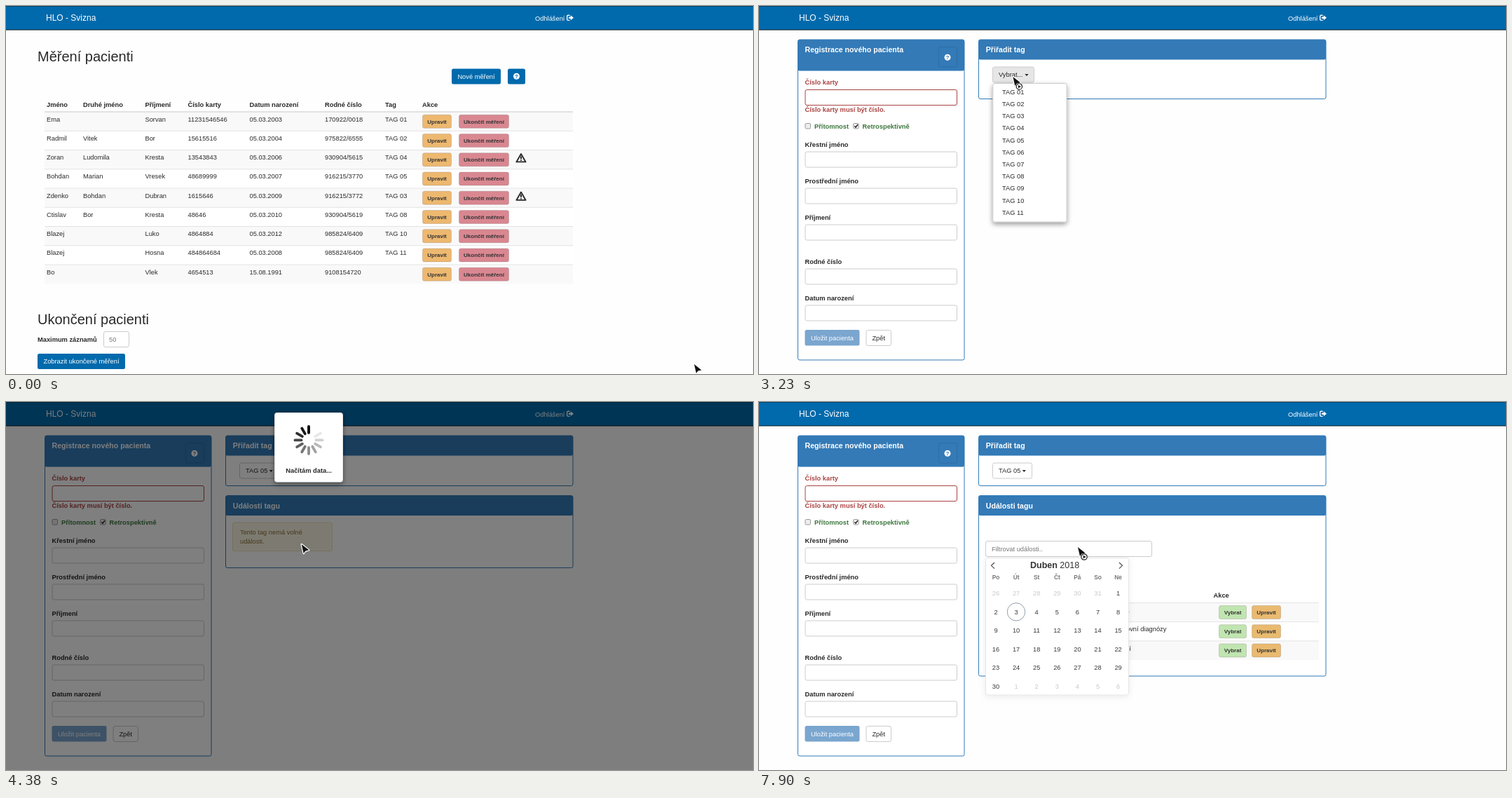
These frames come from a looping animation (1066x525 px, 8000 ms). An HTML page:

```html
<!DOCTYPE html>
<html lang="cs">
<head>
<meta charset="utf-8">
<style>
  html, body { margin: 0; height: 100%; overflow: hidden; background: #fefefe; }
  svg { display: block; font: 9.3px "Liberation Sans", Arial, sans-serif; }
  text { white-space: pre; }
</style>
</head>
<body>
<svg id="stage" width="1066" height="525" viewBox="0 0 1066 525"></svg>
<script>
const INK = '#292929', BRAND = '#016aac', PANEL = '#337ab7', RED = '#a94442', GREEN = '#3c763d';
const LOOP = 8000;

// Drawing helpers
const text = (x, y, s, fill = INK, size = 9.3, extra = '') =>
  `<text x="${x}" y="${y}" fill="${fill}" font-size="${size}" ${extra}>${s}</text>`;
const bold = (x, y, s, fill, size) => text(x, y, s, fill, size, 'font-weight="700"');
const centered = (x, y, s, fill, size, weight = 400) =>
  text(x, y, s, fill, size, `text-anchor="middle" font-weight="${weight}"`);
const box = (x1, y1, x2, y2, fill, stroke = 'none', r = 2.5, extra = '') =>
  `<rect x="${x1}" y="${y1}" width="${x2 - x1}" height="${y2 - y1}" rx="${r}" fill="${fill}" stroke="${stroke}" ${extra}/>`;
const path = (d, fill, extra = '') => `<path d="${d}" fill="${fill}" ${extra}/>`;
const group = (id, content, extra = '') => `<g id="${id}" ${extra}>${content}</g>`;
const each = (list, draw) => list.map(draw).join('');

const field = (y, stroke = '#ccc') => box(66, y, 282.5, y + 22, '#fff', stroke);
const smallButton = (x1, x2, y, label, fill) =>
  box(x1, y, x2, y + 19, fill, 'rgba(120,100,100,.25)') + centered((x1 + x2) / 2, y + 12.4, label, '#333', 8, 700);
const help = (x, y, color) =>
  `<circle cx="${x}" cy="${y}" r="4.5" fill="#fff"/>` + centered(x, y + 2.8, '?', color, 8, 700);
const caret = x => path(`M${x - 2.6} 97h5.2l-2.6 2.9z`, INK);
const checkbox = y => x => box(x, y, x + 7.5, y + 7.5, '#eee', '#999', 1.5);
const panel = (x1, y1, x2, y2, headBottom, title) =>
  box(x1, y1, x2, y2, '#fff', PANEL) + box(x1, y1, x2, headBottom, PANEL) +
  bold(x1 + 10.3, y1 + 18, title, '#fff', 10.6);

// List page
const columns = [58, 110, 198.5, 259.5, 347.5, 455, 541, 594];
const headings = ['Jméno', 'Druhé jméno', 'Příjmení', 'Číslo karty', 'Datum narození', 'Rodné číslo', 'Tag', 'Akce'];
const patients = [
  'Ema||Sorvan|11231546546|05.03.2003|170922/0018|TAG 01',
  'Radmil|Vitek|Bor|15615516|05.03.2004|975822/6555|TAG 02',
  'Zoran|Ludomila|Kresta|13543843|05.03.2006|930904/5615|TAG 04',
  'Bohdan|Marian|Vresek|48689999|05.03.2007|916215/3770|TAG 05',
  'Zdenko|Bohdan|Dubran|1615646|05.03.2009|916215/3772|TAG 03',
  'Ctislav|Bor|Kresta|48646|05.03.2010|930904/5619|TAG 08',
  'Blazej||Luko|4864884|05.03.2012|985824/6409|TAG 10',
  'Blazej||Hosna|484864684|05.03.2008|985824/6409|TAG 11',
  'Bo||Vlek|4654513|15.08.1991|9108154720|'
];
const warning = y =>
  path(`M735 ${y - 6}l6.6 11.4h-13.2z`, 'none', 'stroke="#292929" stroke-width="1.9" stroke-linejoin="round"') +
  path(`M735 ${y - 2.5}v4M735 ${y + 2.4}v1.6`, 'none', 'stroke="#292929" stroke-width="1.9"');
const stripe = (x1, x2, y, i) =>
  box(x1, y, x2, y + 27.2, i % 2 ? '#fff' : '#f9f9f9', 'none', 0) +
  path(`M${x1} ${y}H${x2}`, 'none', 'stroke="#ddd" stroke-width=".8"');

const patientRow = (row, i) => {
  const y = 151 + 27.25 * i;
  return stripe(55, 809, y, i) +
    each(row.split('|'), (cell, c) => text(columns[c], y + 13.5, cell)) +
    smallButton(594.5, 635.5, y + 4.2, 'Upravit', '#edb86f') +
    smallButton(646.5, 717.5, y + 4.2, 'Ukončit měření', '#d98791') +
    (i === 2 || i === 4 ? warning(y + 11.5) : '');
};

const listPage = text(45, 79, 'Měření pacienti', INK, 20) +
  box(636, 89.5, 706, 111.5, BRAND, 'none', 2.5, 'id="newButton"') + centered(671, 103.7, 'Nové měření', '#fff') +
  box(716, 89.5, 741, 111.5, BRAND) + help(728.5, 100.3, BRAND) +
  each(headings, (h, i) => bold(columns[i], 143.5, h)) +
  each(patients, patientRow) +
  path('M55 151H809', 'none', 'stroke="#ddd" stroke-width="1.3"') +
  text(45, 454, 'Ukončení pacienti', INK, 20) +
  bold(45, 479, 'Maximum záznamů') +
  box(139.5, 464.5, 175.5, 486.5, '#fff', '#ccc') + text(147, 479, '50', '#777') +
  box(45, 496, 170, 518, BRAND) + centered(107.5, 510.3, 'Zobrazit ukončené měření', '#fff');

// Registration form; the lower part moves down while the choice is missing
const formFields = [['Křestní jméno', 201], ['Prostřední jméno', 253.2], ['Příjmení', 305.3],
  ['Rodné číslo', 367.5], ['Datum narození', 419.7]];
const form = `<rect id="formFrame" x="55.5" y="48" width="237.5" height="457" rx="2.5" fill="#fff" stroke="${PANEL}"/>` +
  box(55.5, 48, 293, 92.5, PANEL) + bold(65.5, 66.3, 'Registrace nového pacienta', '#fff', 10.6) +
  box(256.5, 58.5, 282.5, 87, 'none', '#2e6da4') + help(269, 73.3, PANEL) +
  bold(65.5, 112.3, 'Číslo karty', RED) + field(119.5, RED) +
  bold(65.5, 151.3, 'Číslo karty musí být číslo.', RED) +
  each([66, 134.7], checkbox(167.5)) +
  path('M136.3 171.2l1.7 2 3-4.2', 'none', 'id="tick" stroke="#222" stroke-width="1.4"') +
  group('choices', bold(79, 174.5, 'Přítomnost', 'currentColor') + bold(147.5, 174.5, 'Retrospektivně', 'currentColor')) +
  group('choiceError', bold(65.5, 188.5, 'Vyberte jednu možnost.', RED)) +
  group('formLower', each(formFields, ([label, y]) => bold(65.5, y, label) + field(Math.round(y) + 7)) +
    box(65.5, 462, 143.5, 484.5, '#7aa6cf') + centered(104.5, 476.6, 'Uložit pacienta', '#fff') +
    box(153, 462.5, 188.5, 484.5, '#fff', '#ccc') + centered(170.7, 476.6, 'Zpět'));

// Tag choice and its events
const tagEmpty = panel(313.5, 48, 809, 132.5, 76.5, 'Přiřadit tag') +
  box(333.5, 87, 392.5, 109, '#fff', '#ccc', 2.5, 'id="tagButton"') + text(342, 101.3, 'Vybrat...') + caret(382) +
  bold(333.5, 119.2, 'Přidejte tag.', RED);
const tagMenu = box(333.8, 110.5, 439, 308, '#fff', '#ccc', 2.5, 'filter="url(#shadow)"') +
  box(334.3, 0, 438.5, 17, '#f0f0f0', 'none', 0, 'id="tagHover"') +
  each([...Array(11).keys()], i => text(347, 125.8 + 17.2 * i, 'TAG ' + String(i + 1).padStart(2, '0')));
const tagChosen = panel(313.5, 48, 809, 119.5, 76.5, 'Přiřadit tag') +
  box(333.5, 87, 389.5, 109, '#fff', '#ccc') + text(342, 101.3, 'TAG 05') + caret(378.3);
const noEvents = panel(313.5, 133.5, 809, 236.5, 162, 'Události tagu') +
  box(323.5, 172, 465.5, 212.5, '#fcf8e3', '#ecdfc0') +
  text(334, 189.2, 'Tento tag nemá volné', '#8a6d3b') + text(334, 202.4, 'události.', '#8a6d3b');

const events = [['12:30:00 21.09.2017', 'Pøíjem pacienta'],
  ['12:30:42 23.09.2017', 'Stanovení pracovní diagnózy'], ['12:30:00 25.09.2017', 'Konec vyšetøení']];
const eventRow = ([time, name], i) => {
  const y = 286.5 + 27.2 * i;
  return stripe(323.5, 799, y, i) + text(327, y + 13.6, time) + text(461.5, y + 13.6, name) +
    smallButton(656.5, 695.5, y + 4, 'Vybrat', '#c0e5b0') + smallButton(703.5, 744.5, y + 4, 'Upravit', '#e9ba6f');
};
const eventList = panel(313.5, 133.5, 809, 391, 162, 'Události tagu') +
  box(323.5, 198.5, 560.5, 220.5, '#fff', '#ccc') + text(332, 213, 'Filtrovat události..', '#777') +
  bold(323.5, 244, 'Vyberte minimálně 1 událost.', RED) +
  bold(327, 279, 'Čas') + bold(461.5, 279, 'Název') + bold(648.5, 279, 'Akce') +
  each(events, eventRow);

// Calendar: April 2018 begins on Sunday
const dayX = i => 338 + 29.1 * i;
const day = (_, i) => {
  const n = i - 5, inMonth = n > 0 && n <= 30;
  const label = n <= 0 ? n + 31 : n > 30 ? n - 30 : n;
  return centered(dayX(i % 7), 276.3 + 26.45 * Math.floor(i / 7), label, inMonth ? '#393939' : '#c8c8c8');
};
const chevron = (x, dir) =>
  path(`M${x - 2 * dir} 229l${4.5 * dir} 4.3l${-4.5 * dir} 4.3`, 'none', 'stroke="#444" stroke-width="1.1"');
const calendar = box(323.5, 222.5, 527.5, 418, '#fff', '#e6e6e6', 3, 'filter="url(#softShadow)"') +
  chevron(334, -1) + chevron(516, 1) + bold(387, 237.4, 'Duben', '#333', 12.5) + text(429.3, 237.4, '2018', '#333', 12.5) +
  each(['Po', 'Út', 'St', 'Čt', 'Pá', 'So', 'Ne'], (d, i) => centered(dayX(i), 252.5, d, '#777', 8.4, 700)) +
  `<circle cx="367" cy="299.4" r="12.7" fill="none" stroke="#959ea9"/>` +
  each([...Array(42)], day);

// Loading dialog
const spokes = each([...Array(12).keys()], i =>
  `<line class="spoke" x1="432" y1="49.5" x2="432" y2="40.5" stroke-width="3.8" stroke-linecap="round" transform="rotate(${30 * i} 432 60)"/>`);
const dialog = box(383, 20.5, 481, 120, '#fff', 'rgba(0,0,0,.2)', 4, 'filter="url(#shadow)"') +
  spokes + bold(399.3, 106.5, 'Načítám data...');

const navbar = box(0, 0, 1066, 34, BRAND, 'none', 0) + box(0, 0, 1066, 1, '#06436c', 'none', 0) +
  box(0, 33.5, 1066, 34.5, '#0a1a26', 'none', 0) +
  text(57, 21, 'HLO - Svizna', '#fff', 12) + text(755, 20.5, 'Odhlášení', '#fff') +
  path('M804.5 13.2h-2.5q-1.3 0-1.3 1.3v4.6q0 1.3 1.3 1.3h2.5', 'none', 'stroke="#fff" stroke-width="1.4"') +
  path('M803 15.6h2.8v-2.3l4.2 3.5-4.2 3.5V18H803z', '#fff');
const pointer = path('M0 0L3 13 5.6 9.6 10.6 8.4z', '#111',
    'stroke="#fff" stroke-width="2.4" paint-order="stroke" stroke-linejoin="round"') +
  group('badge', '<circle cx="9" cy="14" r="4.2" fill="#fff" stroke="#222" stroke-width="1.2"/>' +
    path('M7.6 11.7l4 2.3-4 2.3z', '#111'));

const shadow = (id, dy, blur, alpha) => `<filter id="${id}" x="-30%" y="-30%" width="160%" height="160%">
  <feDropShadow dx="0" dy="${dy}" stdDeviation="${blur}" flood-opacity="${alpha}"/></filter>`;

document.getElementById('stage').innerHTML =
  `<defs>${shadow('shadow', 3, 3.5, .4)}${shadow('softShadow', 2, 4, .08)}</defs>` +
  navbar + group('listPage', listPage) +
  group('formPage', form + group('tagEmpty', tagEmpty) + group('tagMenu', tagMenu) + group('tagChosen', tagChosen) +
    group('noEvents', noEvents) + group('eventList', eventList)) +
  group('calendar', calendar) +
  box(0, 0, 1066, 525, '#000', 'none', 0, 'id="shade"') +
  group('dialog', dialog) + group('pointer', pointer);

// Timeline, in ms
const FORM = 1150, CHECK = 2080, MENU = 3050, PICK = 4090, LOAD = 4155, LOADED = 6240, CALENDAR = 7220;
const track = [[100, 982, 511], [830, 668, 96], [1050, 668, 97], [2060, 171, 170], [2250, 171, 170],
  [2620, 237, 136], [2980, 362, 97], [3150, 362, 98], [3900, 373, 189], [4190, 373, 190], [4390, 422, 203],
  [5580, 449, 206], [6080, 457, 209], [6680, 458, 210], [7300, 458, 210], [7900, 455, 207]];

const $ = Object.fromEntries([...document.querySelectorAll('[id]')].map(el => [el.id, el]));
const spokeLines = document.querySelectorAll('.spoke');
const clamp = v => Math.min(1, Math.max(0, v));
const easeOut = v => 1 - (1 - clamp(v)) ** 2;
const show = (el, on) => el.setAttribute('display', on ? 'inline' : 'none');
const within = (t, a, b) => t >= a && t < b;

function pointerAt(t) {
  const next = track.findIndex(k => k[0] > t);
  if (next === 0) return track[0].slice(1);
  if (next < 0) return track.at(-1).slice(1);
  const [t0, x0, y0] = track[next - 1], [t1, x1, y1] = track[next];
  const p = (t - t0) / (t1 - t0), e = p * p * (3 - 2 * p);
  return [x0 + (x1 - x0) * e, y0 + (y1 - y0) * e];
}

function render(t) {
  const [x, y] = pointerAt(t);
  $.pointer.setAttribute('transform', `translate(${x} ${y})`);
  show($.badge, within(t, 740, FORM) || within(t, 1960, 2350) || within(t, 2880, 4230) || t >= LOADED);

  show($.listPage, t < FORM);
  show($.formPage, t >= FORM);
  $.newButton.setAttribute('fill', t > 760 ? '#01507f' : BRAND);

  const checked = t >= CHECK, shift = checked ? 0 : 14;
  show($.tick, checked);
  show($.choiceError, !checked);
  $.choices.setAttribute('color', checked ? GREEN : RED);
  $.formLower.setAttribute('transform', `translate(0 ${shift})`);
  $.formFrame.setAttribute('height', 457 + shift);

  show($.tagEmpty, within(t, CHECK, PICK));
  $.tagButton.setAttribute('fill', t > 2900 ? '#e6e6e6' : '#fff');
  show($.tagMenu, within(t, MENU, PICK));
  const item = Math.floor((y - 114) / 17.2);
  show($.tagHover, item >= 0);
  $.tagHover.setAttribute('y', 114 + 17.2 * item);
  show($.tagChosen, t >= PICK);
  show($.noEvents, within(t, PICK, LOADED));
  show($.eventList, t >= LOADED);

  const fade = clamp((t - LOAD) / 200) * (1 - clamp((t - LOADED) / 180));
  const slide = easeOut((t - LOAD - 15) / 400) * (1 - easeOut((t - LOADED) / 300));
  $.shade.setAttribute('opacity', fade / 2);
  $.dialog.setAttribute('opacity', fade);
  $.dialog.setAttribute('transform', `translate(0 ${-25 * (1 - slide)})`);
  const head = Math.floor((t - 4375) / 109) + 120;
  spokeLines.forEach((line, i) => {
    const v = Math.round(255 * ((head - i) % 12) / 11);
    line.setAttribute('stroke', `rgb(${v},${v},${v})`);
  });

  const opened = easeOut((t - CALENDAR) / 300);
  show($.calendar, opened > 0);
  $.calendar.setAttribute('opacity', opened);
  $.calendar.setAttribute('transform', `translate(0 ${-13 * (1 - opened)})`);
}

const start = performance.now();
function tick() {
  render((performance.now() - start) % LOOP);
  requestAnimationFrame(tick);
}
tick();
</script>
</body>
</html>
```
